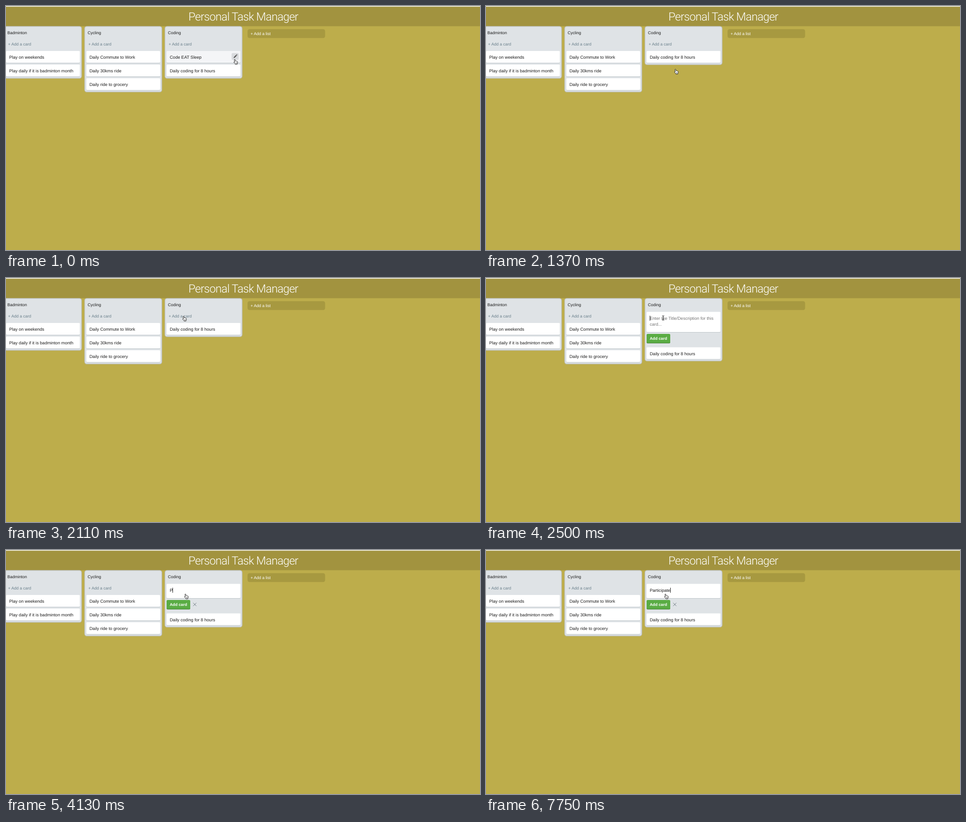
An HTML page for the animation above (8000 ms loop, 1042 by 537 pixels).

```html
<!DOCTYPE html>
<html lang="en">
<head>
<meta charset="utf-8">
<title>Personal Task Manager</title>
<style>
  html, body { margin: 0; width: 100%; height: 100%; overflow: hidden; background: #bdad4b; }
  svg { display: block; width: 100vw; height: 100vh; }
  text { font: 9.5px "Liberation Sans", Arial, sans-serif; fill: #1c1c1c; text-rendering: geometricPrecision; white-space: pre; }
  .heading { font: 300 25px Roboto, "Liberation Sans", sans-serif; letter-spacing: -.75px; fill: #fff; }
  .small { font-size: 9px; }
  .muted { font-size: 9px; fill: #6b808c; }
  .light { font-size: 9px; fill: #fff; }
  .hint { fill: #757575; }
  .label { font-size: 8.8px; font-weight: 700; fill: #fff; text-anchor: middle; }
  .cross { stroke: #6b7780; stroke-width: 1; fill: none; }
  .pointer { fill: #fff; stroke: #111; stroke-width: .9; stroke-linejoin: round; stroke-linecap: round; }
  .beam { fill: none; stroke: #111; stroke-width: 1; }
</style>
</head>
<body>
<svg viewBox="0 0 1042 537" preserveAspectRatio="none">
  <rect width="1042" height="537" fill="#bdad4b"/>
  <rect width="1042" height="44.5" fill="#a2933f"/>
  <rect width="1042" height="1.5" fill="#fbfaf5"/>
  <text class="heading" x="401" y="32">Personal Task Manager</text>
  <rect x="531" y="51" width="170.5" height="19.5" rx="4.5" fill="#a79940"/>
  <text class="light" x="537.5" y="64">+ Add a list</text>
  <g id="board"></g>
  <rect id="caret" width="1" height="11" fill="#111"/>
  <g id="hand" class="pointer">
    <path d="M1.3 1.3Q1.2 0 2.3 0Q3.2 0 3.4 1.1L3.8 3.6Q4.8 3 5.4 3.9Q6.4 3.4 6.9 4.4Q8.3 4 8.6 5.5V7.4Q8.4 8.8 7.7 9.7V10.8H3.4V9.8Q1.6 8.2.3 6.3Q.1 5.2 1.9 5.8Z"/>
    <path d="M4.4 7.2V9M5.7 7.2V9M7 7.2V9" stroke-width=".5"/>
  </g>
  <g id="palm" class="pointer">
    <path d="M2.2 6.2L1.4 3Q1.3 1.8 2.2 1.7Q2.9 1.7 3.2 2.7L3.4 1.2Q3.6.2 4.5.3Q5.3.4 5.3 1.3Q6.5.3 7 1.7L7.1 2.7Q8.4 2.2 8.6 3.5V7Q8.4 8.6 7.6 9.6V11H3.2V9.8Q1.6 8.4.3 6.6Q0 5.3 1.2 5.5Z"/>
    <path d="M3.3 2.7L3.6 5M5.3 1.5V4.8M7.1 2.7V5" stroke-width=".6"/>
  </g>
  <g id="beam" class="beam">
    <path d="M-2.2 -5Q0 -5 0 -3.8Q0 -5 2.2 -5M0 -4V4M-2.2 5Q0 5 0 3.8Q0 5 2.2 5M-1.3 2H1.3"/>
  </g>
</svg>
<script>
const $ = id => document.getElementById(id);
const GREEN = ['#5aac44', '#3f7d2e'], RED = ['#eb2427', '#b3191c'];

const box = (x, y, w, h, r, fill, more = '') =>
  `<rect x="${x}" y="${y}" width="${w}" height="${h}" rx="${r}" fill="${fill}" ${more}/>`;
const text = (x, y, str, cls = '', id = '') =>
  `<text x="${x}" y="${y}" class="${cls}" id="${id}">${str}</text>`;

const panel = (x, bottom, title) =>
  box(x + .5, 45, 169.5, bottom - 45, 4.5, '#dfe3e6', 'stroke="#bfc4c3" stroke-width="1.4"') +
  text(x + 7, 61.5, title, 'small');
const addLink = x => text(x + 8.5, 86.6, '+ Add a card', 'muted');
const sheet = (x, y, h, fill = '#fff') =>
  box(x + 4, y + 1, 162.5, h, 2, '#bcc4c9') + box(x + 4, y, 162.5, h, 2, fill);
const card = (x, y, str, fill) => sheet(x, y, 26, fill) + text(x + 11, y + 17, str);
const list = (x, title, items) =>
  panel(x, 99 + items.length * 30, title) + addLink(x) +
  items.map((str, i) => card(x, 99 + i * 30, str)).join('');
const button = (x, y, w, str, [fill, edge]) =>
  box(x, y + 1, w, 19.8, 2.5, edge) + box(x, y, w, 19.8, 2.5, fill) +
  text(x + w / 2, y + 13.2, str, 'label');
const cross = (x, y) =>
  `<path class="cross" d="M${x - 3.5} ${y - 3.5}l7 7m0 -7l-7 7"/>`;
const pencil = box(496, 103.5, 15.5, 15, 2.5, '#d9dbde') +
  '<path d="M500.3 114.6l.7-2.4 4.4-4.4 1.7 1.7-4.4 4.4zM505.9 107.3l.7-.7q.5-.4 1 0l.7.7q.4.5 0 1l-.7.7z" fill="#555"/>';

const X = 349, LAST = 'Daily coding for 8 hours';
const coding = bottom => panel(X, bottom, 'Coding');
const edit = closable =>
  coding(194) + addLink(X) + sheet(X, 99, 31.5) + text(360, 117.5, 'Code EAT Sleep') +
  button(353, 134.8, 35, 'Save', GREEN) + button(391, 134.8, 42, 'Delete', RED) +
  (closable ? cross(442.3, 144.7) : '') + card(X, 164, LAST);
const form = (height, content, closable) => {
  const y = 74.5 + height;
  return coding(y + 63.5) + sheet(X, 74.5, height) + content +
    button(353, y + 4, 52, 'Add card', GREEN) +
    (closable ? cross(415, y + 13.8) : '') + card(X, y + 33.5, LAST);
};
const hint = text(360, 92.2, 'Enter the Title/Description for this', 'hint') +
  text(360, 105.4, 'card...', 'hint');

const views = {
  hover: coding(159) + addLink(X) + card(X, 99, 'Code EAT Sleep', '#f4f5f7') + pencil + card(X, 129, LAST),
  editOpen: edit(false),
  edit: edit(true),
  single: list(X, 'Coding', [LAST]),
  formOpen: form(44.5, hint, false),
  form: form(44.5, hint, true),
  typing: form(31.5, text(360, 92.2, '', '', 'entry'), true)
};

$('board').innerHTML =
  list(-4, 'Badminton', ['Play on weekends', 'Play daily if it is badminton month']) +
  list(172.5, 'Cycling', ['Daily Commute to Work', 'Daily 30kms ride', 'Daily ride to grocery']) +
  Object.entries(views).map(([name, body]) => `<g id="${name}">${body}</g>`).join('');

// Each track holds [start ms, value...]; a value stays until the next start.
const viewTrack = [[0, 'hover'], [180, 'editOpen'], [390, 'edit'], [1370, 'single'],
  [2500, 'formOpen'], [2670, 'form'], [4130, 'typing']];
const cursorTrack = [[0, 'hand', 500.5, 117.5], [180, 'beam', 503, 118], [590, 'beam', 503, 117.5],
  [770, 'beam', 486, 122], [980, 'hand', 428, 139], [1190, 'hand', 414, 142],
  [1370, 'hand', 414, 139], [1550, 'palm', 412.4, 116], [1740, 'palm', 406, 103],
  [1930, 'hand', 393, 88], [2110, 'hand', 388, 84], [2500, 'beam', 389.5, 88],
  [2850, 'beam', 394, 96], [3030, 'hand', 392, 96.8]];
const entryTrack = [[0, 0], [4130, 1], [5050, 2], [5590, 3], [5770, 4], [5950, 5],
  [6310, 6], [7210, 8], [7390, 9], [7750, 11]];
const caretTrack = [[0, 0], [180, 1], [980, 0], [2500, 1], [3590, 0], [3950, 1],
  [4670, 0], [5050, 1], [6850, 0], [7210, 1]];

const at = (track, t) => track.filter(step => step[0] <= t).pop().slice(1);
const show = (id, on) => $(id).style.visibility = on ? 'visible' : 'hidden';

function render(t) {
  const [view] = at(viewTrack, t);
  Object.keys(views).forEach(name => show(name, name === view));

  const [kind, x, y] = at(cursorTrack, t);
  ['hand', 'palm', 'beam'].forEach(name => show(name, name === kind));
  $(kind).setAttribute('transform', `translate(${x} ${y})`);

  const entry = $('entry');
  const typed = 'Participate'.slice(0, at(entryTrack, t)[0]);
  if (entry.textContent !== typed) entry.textContent = typed;
  const width = typed ? entry.getComputedTextLength() : 0;
  $('caret').setAttribute('x', Math.round(360 + width));
  $('caret').setAttribute('y', view.startsWith('edit') ? 108 : 83);
  show('caret', at(caretTrack, t)[0]);
}

const start = performance.now();
function tick() {
  render((performance.now() - start) % 8000);
  requestAnimationFrame(tick);
}
tick();
</script>
</body>
</html>
```
